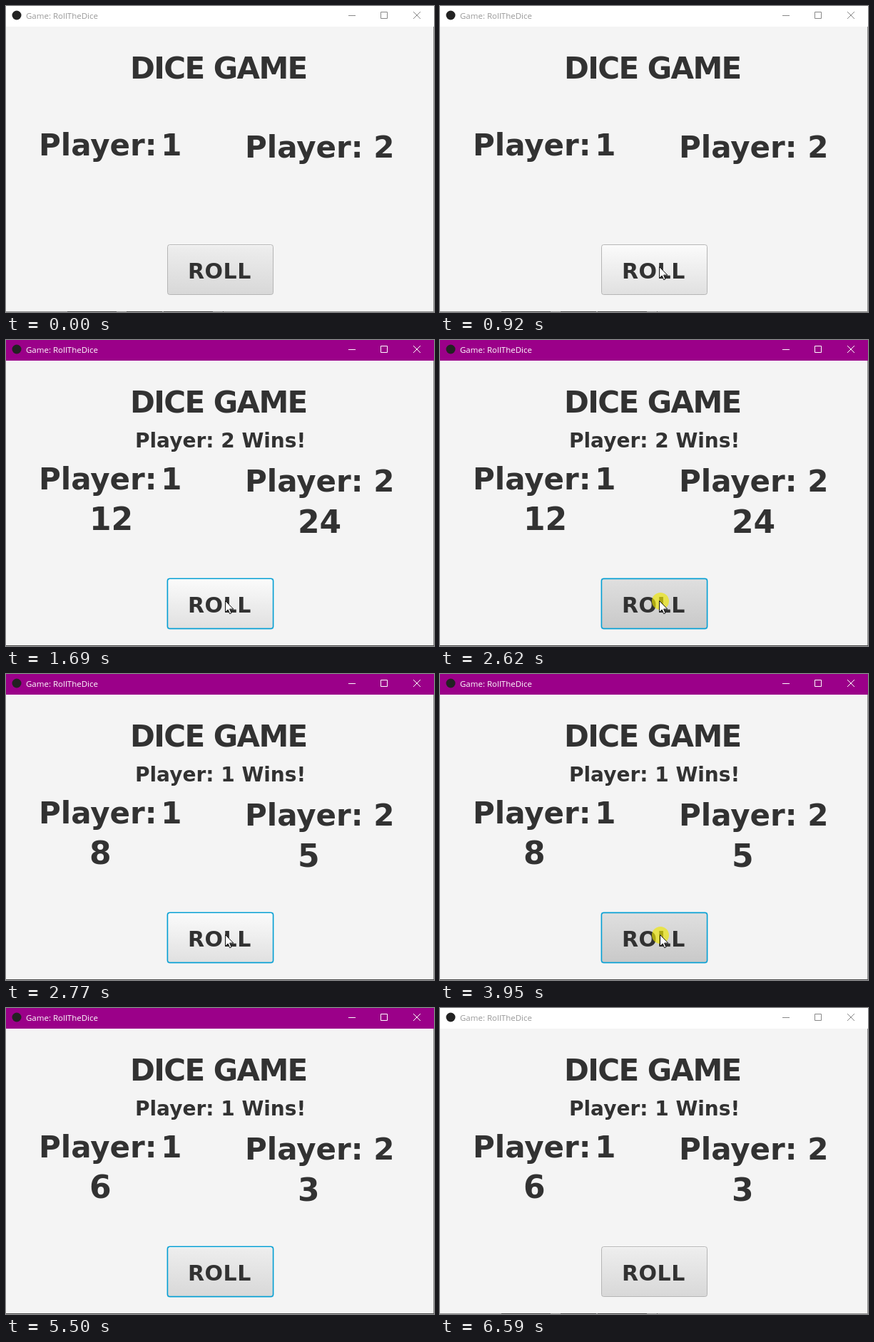
An HTML page that plays this animation: 600x430 px, repeating every 6660 ms.

```html
<!DOCTYPE html>
<html lang="en">
<head>
<meta charset="utf-8">
<title>Dice game</title>
<style>
  html, body { margin: 0; width: 100%; height: 100%; overflow: hidden; background: #f4f4f4; }
  svg { display: block; width: 600px; height: 430px; }
  .big { font: bold 42px "DejaVu Sans", sans-serif; fill: #323232; }
  .title { letter-spacing: -1.6px; }
  .score { font-size: 44px; }
  .status { font-size: 28px; }
  .roll { font-size: 30px; letter-spacing: .5px; }
  .caption { font: 11.5px "Open Sans", sans-serif; }
</style>
</head>
<body>
<svg viewBox="0 0 600 430">
  <defs>
    <linearGradient id="face" x2="0" y2="1">
      <stop id="top"/><stop id="low" offset="1"/>
    </linearGradient>
  </defs>
  <rect id="bar" width="600" height="29"/>
  <circle cx="15" cy="13" r="6.5" fill="#222"/>
  <text id="caption" class="caption" x="28" y="18">Game: RollTheDice</text>
  <path id="controls" fill="none" d="M480 13.5h10M525.5 8.5h9v9h-9zM571 8l10 10M581 8l-10 10"/>
  <path d="M599.5 29V430" stroke="#8c8c8c"/>
  <path id="edge" d="M0 429.5H600"/>
  <path id="behind" d="M86 429.5H305" stroke="#444" stroke-dasharray="69 14 50 2"/>

  <text class="big title" x="174" y="102">DICE GAME</text>
  <text class="big" x="46" y="210" word-spacing="-9">Player: 1</text>
  <text class="big" x="335" y="213">Player: 2</text>
  <text class="big status" id="status" x="181" y="151"></text>
  <text class="big score" id="score1" x="117" y="267"></text>
  <text class="big score" id="score2" x="409" y="271"></text>

  <rect id="glow" x="225.5" y="334.5" width="150" height="72" rx="4" fill="none" stroke="#039ed3" stroke-opacity=".25"/>
  <rect id="button" x="226.5" y="335.5" width="148" height="70" rx="3" fill="url(#face)"/>
  <path id="shine" d="M229 336.5h143" stroke="#fff" stroke-opacity=".8"/>
  <text class="big roll" x="255" y="382.5">ROLL</text>
  <circle id="click" cx="309" cy="367" r="12" fill="#f0e800" fill-opacity=".65"/>
  <path id="cursor" d="M.5 .5V16.5l3.7-3.5 2.5 5.7 2.3-1-2.4-5.6h5.2z" fill="#fff" stroke="#111"/>
</svg>
<script>
const LOOP = 6660, HOLD = 70, BLUR = 6590;

// Each press of the button: time and the two scores it brings
const rolls = [[1530, 12, 24], [2620, 8, 5], [3950, 14, 3], [4880, 6, 3]];

// Mouse stops: time, x, y
const stops = [
  [70, 264, 396], [130, 266, 371], [450, 266, 371], [920, 307, 366],
  [4950, 308, 366], [5180, 399, 411], [5500, 376, 398]
];

const $ = id => document.getElementById(id);
const set = (id, attrs) => {
  for (const key in attrs) $(id).setAttribute(key, attrs[key]);
};
const show = (id, on) => set(id, { visibility: on ? "visible" : "hidden" });
const ease = u => u * u * (3 - 2 * u);

// Mouse position, or nothing while it is outside the window
function mouse(t) {
  const i = stops.findIndex(stop => t < stop[0]);
  if (i < 1) return [];
  const [t0, x0, y0] = stops[i - 1], [t1, x1, y1] = stops[i];
  const u = ease((t - t0) / (t1 - t0));
  return [x0 + (x1 - x0) * u, y0 + (y1 - y0) * u];
}

function draw(t) {
  const active = t >= rolls[0][0] && t < BLUR;
  const pressed = rolls.some(([at]) => t >= at && t < at + HOLD);
  const result = rolls.filter(([at]) => t >= at + HOLD).pop();
  const [x, y] = mouse(t);
  const hover = x < 375 && y < 406;
  const [top, low] = pressed ? ["#dfdfdf", "#c9c9c9"]
    : hover ? ["#fbfbfb", "#e0e0e0"] : ["#eeeeee", "#d8d8d8"];

  set("bar", { fill: active ? "#9b0089" : "#fff" });
  set("caption", { fill: active ? "#fff" : "#999" });
  set("controls", { stroke: active ? "#fff" : "#888" });
  set("edge", { stroke: active ? "#4c4c4c" : "#8c8c8c" });
  show("behind", !active);

  const [, a = "", b = ""] = result || [];
  $("status").textContent = result ? `Player: ${a > b ? 1 : 2} Wins!` : "";
  $("score1").textContent = a;
  $("score2").textContent = b;

  set("top", { "stop-color": top });
  set("low", { "stop-color": low });
  set("button", { stroke: active ? "#039ed3" : "#b5b5b5", "stroke-width": active ? 1.4 : 1 });
  show("glow", active);
  show("shine", !pressed);
  show("click", pressed);
  show("cursor", x);
  if (x) set("cursor", { transform: `translate(${Math.round(x)} ${Math.round(y)})` });
}

const start = performance.now();
function tick() {
  draw((performance.now() - start) % LOOP);
  requestAnimationFrame(tick);
}
tick();
</script>
</body>
</html>
```
